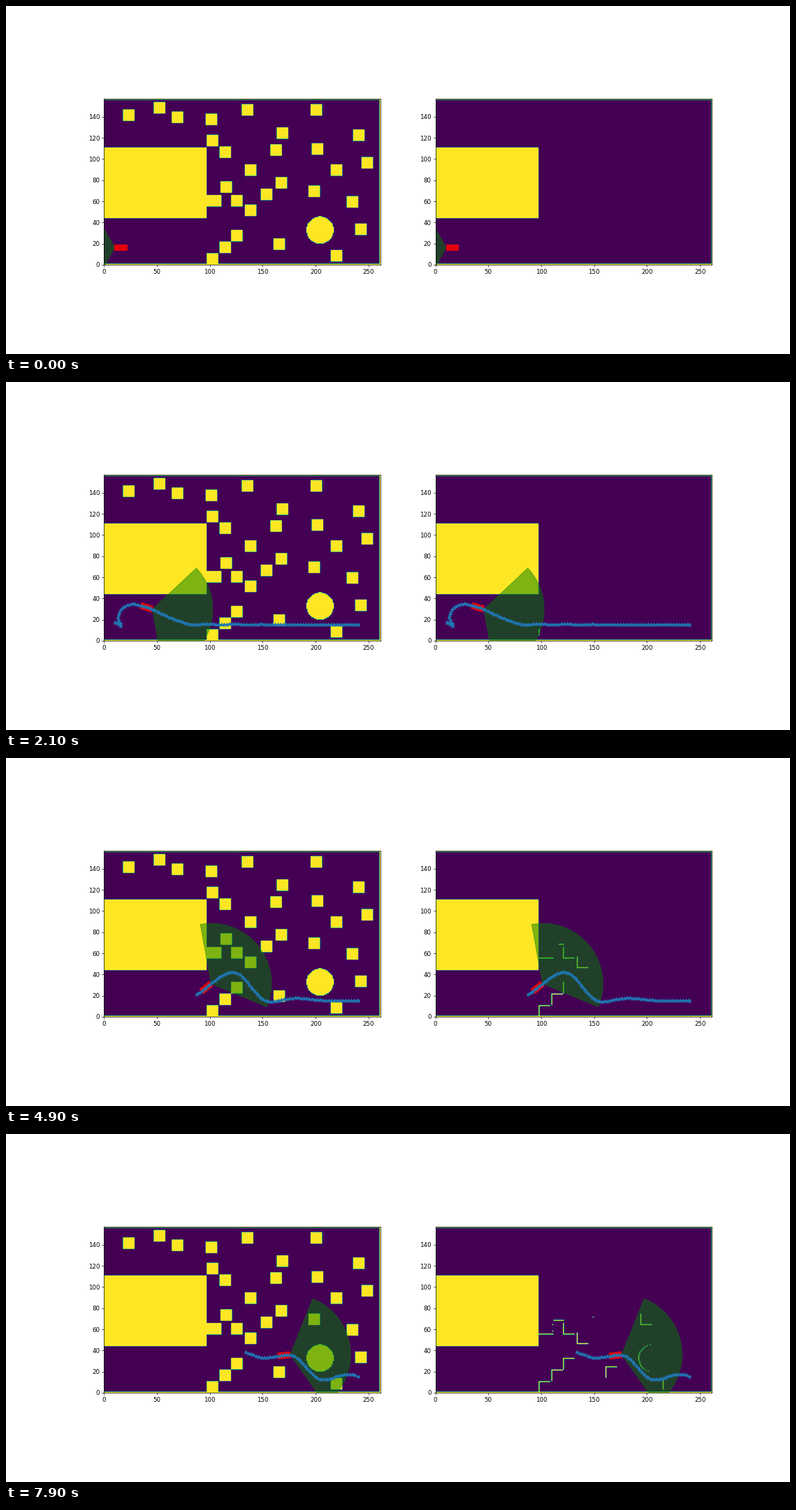
Animation, 1122 px wide and 499 px high, one loop 8 s. Source, as a matplotlib script:

```python
import numpy as np
import matplotlib.pyplot as plt
from matplotlib.animation import FuncAnimation
from matplotlib.patches import Polygon, Wedge

FRAMES = 80
DPI = 62.5
W, H = 261, 157            # arena size in cells
STEP = 2.65                # distance driven per frame
CAR_LEN, CAR_WID = 12, 6.4
REACH, HALF_FOV = 57, 61.5
BLOCK = 11
GOAL = (240.2, 15.1)

STAIRS = [(round(97 + 11.6 * k), 11 * k) for k in range(3)]
BLOCKS = STAIRS + [
    (18, 136), (47, 143), (64, 134), (96, 132), (130, 141), (195, 141),
    (163, 119), (157, 103), (235, 117), (243, 91), (196, 104), (214, 84),
    (97, 112), (109, 101), (133, 84), (110, 68), (162, 72), (148, 61),
    (97, 55), (100, 55), (120, 55), (193, 64), (229, 54), (133, 46),
    (237, 28), (160, 14), (214, 3),
]


def base_map():
    grid = np.zeros((H, W))
    grid[0] = grid[-1] = grid[:, -1] = 1
    grid[44:111, :97] = 1
    return grid


def full_map():
    grid = base_map()
    for x, y in BLOCKS:
        grid[y:y + BLOCK, x:x + BLOCK] = 1
    yy, xx = np.mgrid[:H, :W] + 0.5
    grid[np.hypot(xx - 204, yy - 32.7) <= 12.9] = 1
    return grid


def weave(*keys):
    """Monotone cubic from key to key, level at each crest and dip."""
    x, y = np.array([*keys, GOAL]).T
    h = np.diff(x)
    d = np.diff(y) / h
    a, b = d[:-1], d[1:]
    same = a * b > 0
    inner = np.where(same, 2 * a * b / np.where(same, a + b, 1), 0)
    m = np.r_[d[0], inner, d[-1]]
    u = np.linspace(x[0], x[-1], 1000)
    i = np.clip(np.searchsorted(x, u, side="right") - 1, 0, len(h) - 1)
    s = (u - x[i]) / h[i]
    ease = s * s * (3 - 2 * s)
    v = (y[i] + (y[i + 1] - y[i]) * ease
         + h[i] * s * (1 - s) * (m[i] * (1 - s) - m[i + 1] * s))
    return np.column_stack([u, v])


def turn_pose(frame):
    """Three-point turn at the start: x, y, heading in degrees."""
    times = [0, 2, 5, 6]
    return (np.interp(frame, times, [16, 10.6, 16, 14.9]),
            np.interp(frame, times, [16, 17.2, 14, 16.5]),
            np.interp(frame, times, [180, 150, 120, 115]))


def first_route():
    """Elliptic bend out of the corner, a straight slope, then ripples."""
    a = np.linspace(np.pi, np.pi / 2, 100)
    bend = np.column_stack([29 + 16 * np.cos(a), 21 + 13.7 * np.sin(a)])
    run = weave((29, 34.7), (41, 31.2), (72.5, 17.9), (86, 15))
    far = np.clip(run[:, 0] - 86, 0, None)
    run[:, 1] += 0.45 * np.exp(-far / 90) * (1 - np.cos(far * np.pi / 12.5))
    return np.vstack([turn_pose(TURN_END)[:2], bend, run])


TURN_END = 6
DETOUR = [(122, 42), (156, 14), (181, 17.5), (212, 15.1)]

# Frame at which each route starts, speed, curve
ROUTES = [
    (TURN_END, STEP, first_route()),
    (36, 1.5, weave((76.3, 16.4), (80, 15.7), (88, 21), *DETOUR)),
    (45, 2.75, weave((87.7, 21), *DETOUR)),
    (54, STEP, weave((106.8, 35.6), (121.5, 42.5), (140, 35), (151, 23.7),
                     (169, 9.8), (203, 17.8), (231, 12.8))),
    (65, STEP, weave((133.9, 37.9), (152, 33), (175.5, 35.6),
                     (206, 12.2), (232, 17.4))),
]


def along(curve, s):
    """Points at distance s from the start of the curve."""
    length = np.r_[0, np.cumsum(np.hypot(*np.diff(curve, axis=0).T))]
    return np.column_stack([np.interp(s, length, c) for c in curve.T])


def stars(curve):
    total = np.hypot(*np.diff(curve, axis=0).T).sum()
    return along(curve, np.append(np.arange(0, total - 1, STEP), total))


trails = [stars(curve) for _, _, curve in ROUTES]
turn_trail = np.column_stack(turn_pose(np.arange(TURN_END))[:2])
trails[0] = np.vstack([turn_trail, trails[0]])


def route_index(frame):
    # A new plan shows one frame after the pose it starts from.
    return max([k for k, r in enumerate(ROUTES) if frame > r[0]], default=0)


def pose(frame):
    """Car centre and heading in radians."""
    if frame <= TURN_END:
        x, y, deg = turn_pose(frame)
        return np.array([x, y]), np.radians(deg)
    start, speed, curve = ROUTES[route_index(frame)]
    s = (frame - start) * speed
    back, here, ahead = along(curve, [s - 1, s, s + 1])
    dx, dy = ahead - back
    return here, np.arctan2(dy, dx)


def nose(centre, heading):
    return centre + CAR_LEN / 2 * np.array([np.cos(heading), np.sin(heading)])


def scan(grid, origin, heading):
    """Cells hit first by each ray of the sensor."""
    fov = np.radians(HALF_FOV)
    ang = heading + np.linspace(-fov, fov, 124)[:, None]
    dist = np.arange(0.5, REACH - 0.2, 0.3)
    x = np.floor(origin[0] + dist * np.cos(ang)).astype(int)
    y = np.floor(origin[1] + dist * np.sin(ang)).astype(int)
    inside = (x >= 0) & (x < W) & (y >= 0) & (y < H)
    hit = inside & (grid[np.clip(y, 0, H - 1), np.clip(x, 0, W - 1)] > 0)
    rows = np.flatnonzero(hit.any(axis=1))
    first = hit[rows].argmax(axis=1)
    return y[rows, first], x[rows, first]


world = full_map()
known = base_map()
seen_at = np.full(world.shape, FRAMES)
for f in range(FRAMES):
    centre, heading = pose(f)
    cells = scan(world, nose(centre, heading), heading)
    seen_at[cells] = np.minimum(seen_at[cells], f)


class Panel:
    def __init__(self, ax, grid):
        self.image = ax.imshow(grid, origin="lower", extent=(0, W, 0, H),
                               vmin=0, vmax=1)
        self.wedge = ax.add_patch(
            Wedge((0, 0), REACH, 0, 1, color="g", alpha=0.5))
        self.car = ax.add_patch(
            Polygon(np.zeros((4, 2)), facecolor="r", alpha=0.85, lw=0))
        self.trail, = ax.plot([], [], "*-", color="C0")
        ax.set(xlim=(0, W), ylim=(0, H))

    def show_car(self, frame):
        centre, a = pose(frame)
        deg = np.degrees(a)
        self.wedge.set_center(tuple(nose(centre, a)))
        self.wedge.set_theta1(deg - HALF_FOV)
        self.wedge.set_theta2(deg + HALF_FOV)
        corners = np.array([(-1, -1), (1, -1), (1, 1), (-1, 1)])
        corners = corners * (CAR_LEN / 2, CAR_WID / 2)
        turn = np.array([[np.cos(a), np.sin(a)], [-np.sin(a), np.cos(a)]])
        self.car.set_xy(centre + corners @ turn)
        route = trails[route_index(frame)] if frame else np.empty((0, 2))
        self.trail.set_data(route[:, 0], route[:, 1])


fig, axes = plt.subplots(1, 2, figsize=(1122 / DPI, 499 / DPI), dpi=DPI)
left, right = panels = [Panel(ax, g) for ax, g in zip(axes, (world, known))]


def draw(frame):
    right.image.set_data(np.where(seen_at <= frame, 1, known))
    for panel in panels:
        panel.show_car(frame)
    return []


anim = FuncAnimation(fig, draw, frames=FRAMES, interval=100,
                     init_func=lambda: draw(0), repeat=True, blit=False)
plt.show()
```
